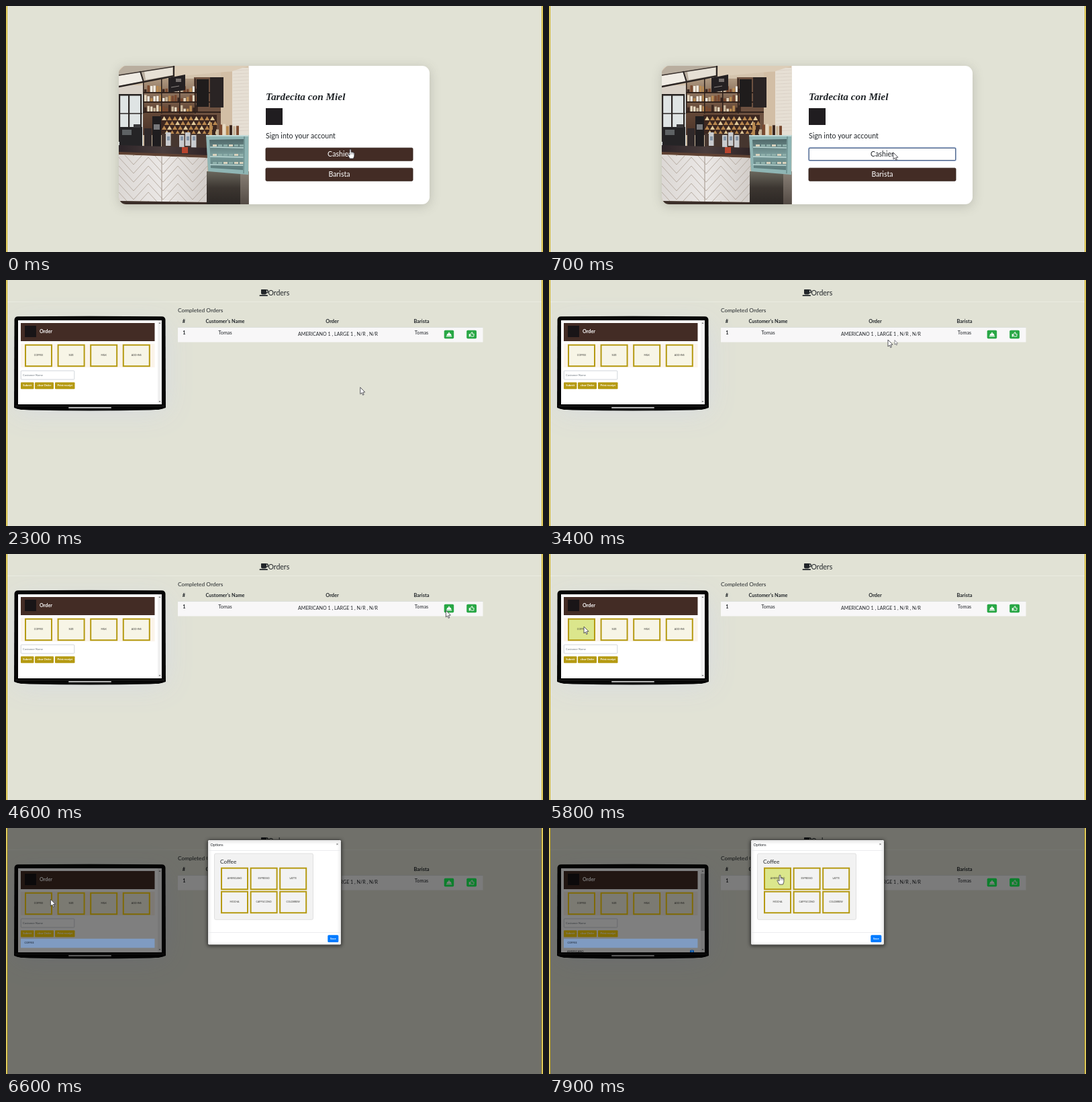
Write an HTML page with a canvas that moves like this. It is 800 by 366 pixels and loops after 8 s.

```html
<!DOCTYPE html>
<html lang="en">
<head>
<meta charset="utf-8">
<title>Coffee orders</title>
<style>
html, body { margin: 0; width: 100%; height: 100%; overflow: hidden; background: #e1e2d5; }
canvas { display: block; width: 800px; height: 366px; }
</style>
</head>
<body>
<canvas id="stage"></canvas>
<script>
const LOOP = 8000;
const canvas = document.getElementById('stage');
const g = canvas.getContext('2d');
const dpr = window.devicePixelRatio || 1;
canvas.width = 800 * dpr;
canvas.height = 366 * dpr;

const INK = '#212529', BROWN = '#432c25', BG = '#e1e2d5', LIME = '#dbe68c';
const SANS = 'Lato, "Open Sans", sans-serif';

const clamp = v => Math.max(0, Math.min(1, v));
const span = (t, a, b) => clamp((t - a) / (b - a));
const ease = p => p * p * (3 - 2 * p);
const easeOut = p => 1 - (1 - p) ** 3;

function rect(x, y, w, h, fill) {
  g.fillStyle = fill;
  g.fillRect(x, y, w, h);
}

function round(x, y, w, h, r, fill, stroke, line = 1) {
  g.beginPath();
  g.roundRect(x, y, w, h, r);
  if (fill) { g.fillStyle = fill; g.fill(); }
  if (stroke) { g.strokeStyle = stroke; g.lineWidth = line; g.stroke(); }
}

function poly(points, fill, stroke, line = 1) {
  g.beginPath();
  for (let i = 0; i < points.length; i += 2) g.lineTo(points[i], points[i + 1]);
  g.closePath();
  if (fill) { g.fillStyle = fill; g.fill(); }
  if (stroke) { g.strokeStyle = stroke; g.lineWidth = line; g.stroke(); }
}

function line(x1, y1, x2, y2, color, width = 1) {
  g.strokeStyle = color;
  g.lineWidth = width;
  g.beginPath();
  g.moveTo(x1, y1);
  g.lineTo(x2, y2);
  g.stroke();
}

function text(s, x, y, size, { color = INK, weight = 400, align = 'left', family = SANS } = {}) {
  g.font = `${weight} ${size}px ${family}`;
  g.fillStyle = color;
  g.textAlign = align;
  g.textBaseline = 'middle';
  g.fillText(s, x, y);
}

function shadow(color, blur, y, draw) {
  g.save();
  g.shadowColor = color;
  g.shadowBlur = blur * dpr;
  g.shadowOffsetY = y * dpr;
  draw();
  g.restore();
}

function fade(x1, y1, x2, y2, ...colors) {
  const f = g.createLinearGradient(x1, y1, x2, y2);
  colors.forEach((c, i) => f.addColorStop(i / (colors.length - 1), c));
  return f;
}

function seeded(seed) {
  return () => (seed = (seed * 16807) % 2147483647) / 2147483647;
}

const JARS = ['#e6d8c0', '#b88a52', '#3a2720', '#c9b79c', '#7a4a30', '#f0eadf'];

function shelves(rnd) {
  rect(204, 108, 80, 84, fade(0, 108, 0, 192, '#b09a82', '#6b4e3c', '#4a3227'));
  rect(280, 106, 40, 86, '#6d5140');
  [116, 130, 145].forEach(y => {
    for (let x = 206; x < 284; x += 4.5) {
      const h = 4 + rnd() * 6;
      rect(x, y + 12 - h, 3.4, h, JARS[Math.floor(rnd() * JARS.length)]);
    }
    rect(204, y + 12, 116, 1.8, '#2a1c17');
  });
  [204, 231, 258, 281].forEach(x => rect(x, 108, 1.5, 52, '#2a1f1b'));
  rect(230, 162, 84, 30, '#3c2720');
  for (let row = 0; row < 4; row++) {
    for (let i = 0; i < 10; i++) {
      const x = 232 + i * 8 + row % 2 * 4, y = 164 + row * 7;
      poly([x, y + 6, x + 3.6, y, x + 7.2, y + 6], (i + row) % 3 ? '#b98850' : '#e2c999');
    }
  }
  rect(284, 109, 18, 41, '#1f1c1c');
  rect(304, 106, 20, 45, '#2a2424');
}

function lantern() {
  poly([168, 97, 176, 89, 252, 89, 250, 105, 204, 113, 168, 121], '#b9ae9f');
  poly([168, 104, 200, 98, 204, 112, 168, 119], '#f0ece4');
  poly([206, 97, 248, 91, 248, 103, 208, 110], '#e6e0d5');
  line(168, 120, 251, 104, '#2b2523', 2.4);
  line(168, 103, 251, 90, '#3a322e', 1.6);
  line(200, 97, 205, 113, '#2b2523', 2);
  line(250, 89, 250, 105, '#2b2523', 2);
  poly([242, 107, 267, 102, 267, 125, 242, 129], '#242022');
  line(246, 121, 258, 119, '#8d8683');
  rect(253, 108, 8, 5, '#77706e');
}

function counter() {
  poly([168, 207, 300, 211, 300, 225, 168, 219], fade(168, 0, 300, 0, '#2c2428', '#4a3d3c', '#2f2426'));
  poly([168, 217, 300, 222, 300, 226, 168, 221], '#5f4233');
  g.save();
  poly([168, 221, 300, 226, 300, 292, 168, 290], fade(168, 0, 300, 0, '#dcd8d5', '#ebe8e6', '#d2cdc9'));
  g.clip();
  for (let x = 168; x < 300; x += 44) {
    for (let y = 186; y < 310; y += 13) {
      line(x, y, x + 22, y + 24, '#b3a79c', 0.9);
      line(x + 22, y + 24, x + 44, y, '#b3a79c', 0.9);
    }
  }
  line(232, 222, 232, 292, '#a0948a', 1);
  g.restore();
  poly([168, 290, 300, 292, 300, 296, 168, 296], '#3b2e29');
}

function showcase(rnd) {
  rect(299, 246, 63, 50, fade(0, 246, 0, 295, '#6a675d', '#3c3631', '#2c2724'));
  rect(349, 246, 13, 50, fade(0, 246, 0, 295, '#8a8177', '#544b45'));
  poly([298, 192, 362, 192, 361, 251, 301, 246], '#8fb5b4');
  poly([303, 199, 354, 198, 353, 244, 305, 241], fade(0, 198, 0, 244, '#50696a', '#7a9c9b', '#5c7b7b'));
  [210, 224, 236].forEach(y => {
    line(304, y, 354, y + 1, '#bedbd8', 1.6);
    for (let x = 308; x < 350; x += 8) rect(x, y - 4, 6, 3, rnd() > 0.5 ? '#d8d2bd' : '#8fb0ab');
  });
  line(298, 193, 362, 193, '#c2dad8', 2);
  line(355, 194, 354, 249, '#6d8f8e', 1.6);
}

// Flat picture of a coffee bar
function photo() {
  const rnd = seeded(41);
  g.save();
  g.beginPath();
  g.roundRect(168, 89, 193.5, 206, [11, 0, 0, 11]);
  g.clip();
  rect(168, 89, 194, 206, fade(0, 89, 0, 200, '#d6c6b0', '#c9b59b'));
  rect(320, 98, 18, 96, '#d2bea5');
  rect(337, 92, 25, 102, '#e6dfd4');
  for (let y = 96; y < 190; y += 5) line(338, y, 362, y - 1, '#d5ccc0', 0.6);
  poly([252, 89, 362, 89, 337, 97, 252, 105], '#dccdb8');

  rect(168, 118, 36, 16, '#d8d0c6');
  rect(168, 132, 36, 78, '#dfe4e4');
  rect(168, 131, 34, 2.5, '#24201f');
  [168, 182, 200].forEach(x => rect(x, 132, 2.2, 70, '#2b2624'));
  line(168, 160, 203, 160, '#2b2624', 1.5);

  shelves(rnd);
  lantern();

  rect(232, 190, 68, 21, '#46362f');
  rect(169, 180, 34, 32, '#252426');
  rect(173, 184, 14, 8, '#5e6264');
  rect(190, 176, 10, 5, '#3b3a3c');
  rect(206, 182, 11, 29, '#30292a');
  rect(218, 164, 13, 46, '#1f1d1f');
  rect(220, 176, 9, 8, '#77787b');
  [238, 258, 267, 276].forEach((x, i) => {
    rect(x, 188 + i % 2 * 4, 7.5, 20, '#c9cbce');
    rect(x + 2, 194, 4, 6, '#8796a7');
  });
  for (let i = 0; i < 9; i++) {
    const x = 303 + i * 5, h = 7 + rnd() * 14;
    rect(x, 193 - h, 4, h, JARS[(i + 1) % 5]);
  }

  counter();
  rect(262, 210, 9, 9, '#b8452f');
  showcase(rnd);
  g.restore();
}

function login(t) {
  shadow('rgba(90,90,80,.27)', 16, 3, () => round(168.5, 89, 462.5, 206, 11, '#fff'));
  photo();
  text('Tardecita con Miel', 387, 136, 15.3,
    { weight: 'italic 700', family: '"Liberation Serif", "Noto Serif", serif' });
  rect(387, 152, 25, 25, '#201d20');
  text('Sign into your account', 387, 193.5, 10.6);
  const focused = t >= 300;
  const button = y => round(387, y, 219, 19, 1.5, BROWN, '#2f1d18', 0.9);
  if (focused) {
    round(386, 210, 221, 21, 2.5, '#b9cbe6');
    round(387.3, 211.3, 218.4, 18.4, 1.5, '#fff', '#4f6488', 1.2);
  } else {
    button(211.2);
  }
  text('Cashier', 496.5, 220.5, 10.6, { color: focused ? INK : '#fff', align: 'center' });
  button(241.2);
  text('Barista', 496.5, 250.5, 10.6, { color: '#fff', align: 'center' });
}

function mug() {
  round(380, 14, 8, 7.5, [0.5, 0.5, 2, 2], INK);
  g.strokeStyle = INK;
  g.lineWidth = 1.4;
  g.beginPath();
  g.arc(388, 17, 2.3, -1.5, 1.5);
  g.stroke();
  round(377.5, 22.3, 12.5, 1.7, 0.8, INK);
}

function bell(x, y) {
  g.fillStyle = '#fff';
  g.beginPath();
  g.arc(x, y + 2, 3.5, Math.PI, 0);
  g.fill();
  rect(x - 0.7, y - 3, 1.4, 2, '#fff');
  rect(x - 4.2, y + 2.6, 8.4, 1.1, '#fff');
}

function thumb(x, y) {
  g.lineJoin = 'round';
  poly([x - 1.6, y - 0.6, x + 0.2, y - 3.4, x + 1.3, y - 3, x + 0.9, y - 0.8,
    x + 3.5, y - 0.6, x + 3, y + 3, x - 0.6, y + 3, x - 1.6, y + 2.4], null, '#fff', 0.9);
  rect(x - 4, y - 0.8, 1.8, 4.2, '#fff');
}

function tile(label, x, y, w, fill, edge) {
  rect(x, y, w, 33.5, edge);
  rect(x + 2, y + 2, w - 4, 29.5, fill);
  text(label, x + w / 2, y + 16.5, 3.6, { color: '#3c3c38', align: 'center' });
}

function laptop(hover, gold) {
  shadow('rgba(214,218,226,.95)', 40, 8, () => round(14, 58, 224, 130, 10, '#d9dcdf'));
  g.fillStyle = '#060606';
  g.beginPath();
  g.moveTo(12.5, 59);
  g.quadraticCurveTo(13, 54.5, 18, 54.3);
  g.quadraticCurveTo(125, 53, 232, 54.3);
  g.quadraticCurveTo(237, 54.5, 237.5, 59);
  g.lineTo(238, 190);
  g.quadraticCurveTo(232, 193, 215, 193.5);
  g.quadraticCurveTo(125, 195.5, 35, 193.5);
  g.quadraticCurveTo(17, 193, 12, 190);
  g.fill();
  line(14, 187.5, 236, 187.5, '#2c2c2c', 0.7);
  round(93, 189, 64, 2, 1, '#b9b9b9');
  rect(18, 60, 214, 125, '#fff');
  rect(226, 60, 6, 125, '#f1f1f1');
  poly([227.5, 65, 230.5, 65, 229, 63], '#777');
  poly([227.5, 180, 230.5, 180, 229, 182], '#777');
  rect(22, 64, 199.5, 27, BROWN);
  rect(28, 68, 17, 17, '#191517');
  text('Order', 50, 76.5, 7.2, { color: '#fff', weight: 700 });
  rect(22, 95, 199.5, 35, '#fbf4ea');
  ['COFFEE', 'SIZE', 'MILK', 'ADD-INS'].forEach((s, i) =>
    tile(s, 28 + i * 48.6, 95.7, 41, i === 0 && hover ? LIME : '#f7f5e6', gold));
  round(22.3, 135, 79.5, 13, 1, '#fff', '#c6cbd1', 0.8);
  text('Customer Name', 25, 141.5, 4.2, { color: '#6c757d' });
  [['Submit', 22, 19.5], ['clear Order', 43, 28], ['Print receipt', 73, 29.5]].forEach(([s, x, w]) => {
    round(x, 152.3, w, 10, 1, gold);
    text(s, x + w / 2, 157.2, 4.1, { color: '#fff', weight: 700, align: 'center' });
  });
}

function orders(hover, vivid) {
  const green = vivid ? '#18ff58' : '#28a745';
  const gold = vivid ? '#ffd60c' : '#b59a12';
  line(0, 32.5, 800, 32.5, '#eaebe1');
  mug();
  text('Orders', 390.5, 19.5, 10.5);
  laptop(hover, gold);

  text('Completed Orders', 256, 45.5, 8.35);
  rect(256, 70, 454.5, 1, '#dcdfdb');
  rect(256, 71, 454.5, 21.5, '#f8f7f8');
  const head = { weight: 700, align: 'center' }, cell = { align: 'center' };
  text('#', 265, 61.5, 7.4, head);
  text("Customer's Name", 326.5, 61.5, 7.4, head);
  text('Order', 486, 61.5, 7.4, head);
  text('Barista', 619, 61.5, 7.4, head);
  text('1', 265.3, 79, 7.4, head);
  text('Tomas', 326.5, 79, 7.3, cell);
  text('AMERICANO 1 , LARGE 1 , N/R , N/R', 494.5, 81, 7.15, cell);
  text('Tomas', 619, 79, 7.3, cell);
  round(652.7, 74.8, 14.5, 12.4, 1.8, green);
  round(686.2, 74.8, 14.8, 12.4, 1.8, green);
  bell(660, 80.7);
  thumb(693.7, 81);
}

// Rows added to the order list on the laptop
function orderList(t) {
  if (t < 5950) return;
  g.save();
  g.beginPath();
  g.rect(18, 60, 214, 125);
  g.clip();
  rect(22, 164.7, 199.5, 13.6, '#7f9bc2');
  text('COFFEE', 27.5, 171.3, 3.8, { color: '#17202c' });
  if (t >= 7600) {
    text('AMERICANO', 27, 184, 4.1, { color: '#141517' });
    round(210, 181.5, 6, 6, 1.5, '#064f9e');
    text('1', 213, 184, 3.4, { color: '#cfd6de', align: 'center' });
    rect(226, 68, 6, 85, '#606060');
  }
  g.restore();
}

function modal(t, hover) {
  const p = easeOut(span(t, 6080, 6380));
  if (!p) return;
  g.save();
  g.globalAlpha = p;
  g.translate(0, -23 * (1 - p));
  shadow('rgba(0,0,0,.55)', 5, 1, () => round(300.5, 17.5, 199, 156.5, 2, '#fff', '#4a4a47', 1));
  text('Options', 304.5, 25.5, 5.4);
  text('×', 493.5, 24, 6, { color: '#666', weight: 700, align: 'center' });
  line(301, 33.5, 499, 33.5, '#e6e8ea', 0.8);
  round(310.5, 38, 147, 98.3, 2, '#f2f2f2', '#dadada', 0.8);
  text('Coffee', 319, 50.5, 8.4);
  ['AMERICANO', 'ESPRESSO', 'LATTE', 'MOCHA', 'CAPPUCCINO', 'COLDBREW'].forEach((s, i) =>
    tile(s, 320 + i % 3 * 43.6, i < 3 ? 58.7 : 93.7, 41,
      i === 0 && hover ? LIME : '#f2f2f2', '#b59a12'));
  line(301, 155.5, 499, 155.5, '#e6e8ea', 0.8);
  round(479.3, 159.3, 16, 10.6, 1.5, '#007bff');
  text('Save', 487.3, 164.6, 4.2, { color: '#fff', weight: 700, align: 'center' });
  g.restore();
}

// Pointer path: time, x, y
const path = [
  [0, 513, 213], [350, 513, 213], [450, 513, 218], [850, 513, 218], [1200, 385, 256],
  [1950, 385, 256], [2600, 640, 84], [2950, 662, 82], [3400, 505, 89], [3700, 440, 84],
  [4300, 662, 82], [4650, 655, 84], [5200, 130, 80], [5420, 73, 95], [5650, 52, 108],
  [6500, 52, 108], [7250, 344, 70], [8000, 344, 70]
];

function pointer(t) {
  const i = path.findIndex(k => k[0] > t);
  const [t0, x0, y0] = path[i - 1], [t1, x1, y1] = path[i];
  const p = ease(span(t, t0, t1));
  return [x0 + (x1 - x0) * p, y0 + (y1 - y0) * p];
}

function arrow(x, y, s = 1) {
  g.save();
  g.translate(x, y);
  g.scale(s, s);
  g.lineJoin = 'round';
  poly([0, 0, 0, 10, 2.3, 8, 3.8, 11.5, 5.4, 10.8, 3.9, 7.4, 7, 7.2], '#fff', '#33333a', 0.8);
  g.restore();
}

function hand(x, y) {
  g.save();
  g.translate(x, y);
  g.lineJoin = 'round';
  poly([-1, 0.5, 0, 0, 1, 0.5, 1.1, 4.3, 3, 4.4, 4.7, 5, 6, 6, 5.8, 10.5, 4.5, 14,
    -1, 14, -2.5, 11, -4.2, 8, -3.2, 7.3, -1, 9], '#fff', '#33333a', 0.8);
  [1.2, 2.9, 4.4].forEach(d => line(d, 5, d, 7.8, '#55555c', 0.5));
  g.restore();
}

function draw(t) {
  g.setTransform(dpr, 0, 0, dpr, 0, 0);
  rect(0, 0, 800, 366, BG);
  const [x, y] = pointer(t);

  if (t < 1000) {
    login(t);
  } else {
    const overCoffee = t < 5950 && x > 28 && x < 69 && y > 96 && y < 129;
    const dim = span(t, 5870, 5990);
    orders(overCoffee, dim > 0.5);
    if (t >= 5950 && t < 6250) poly([30, 98, 67, 127, 30, 127], '#d6e878');
    rect(0, 0, 800, 366, `rgba(0,0,0,${dim * 0.5})`);
    orderList(t);
    modal(t, t >= 7200);
  }

  [0, 799].forEach(edge => rect(edge, 0, 1, 366, '#e6da92'));
  [1, 798].forEach(edge => rect(edge, 0, 1, 366, '#d2b010'));

  if (t < 350 || t >= 7200) hand(x, y);
  else arrow(x, y);
  if (t >= 3350 && t < 3500) arrow(x + 10, y + 0.5, 0.65);
}

function frame(now) {
  draw(now % LOOP);
  requestAnimationFrame(frame);
}
requestAnimationFrame(frame);
</script>
</body>
</html>
```
